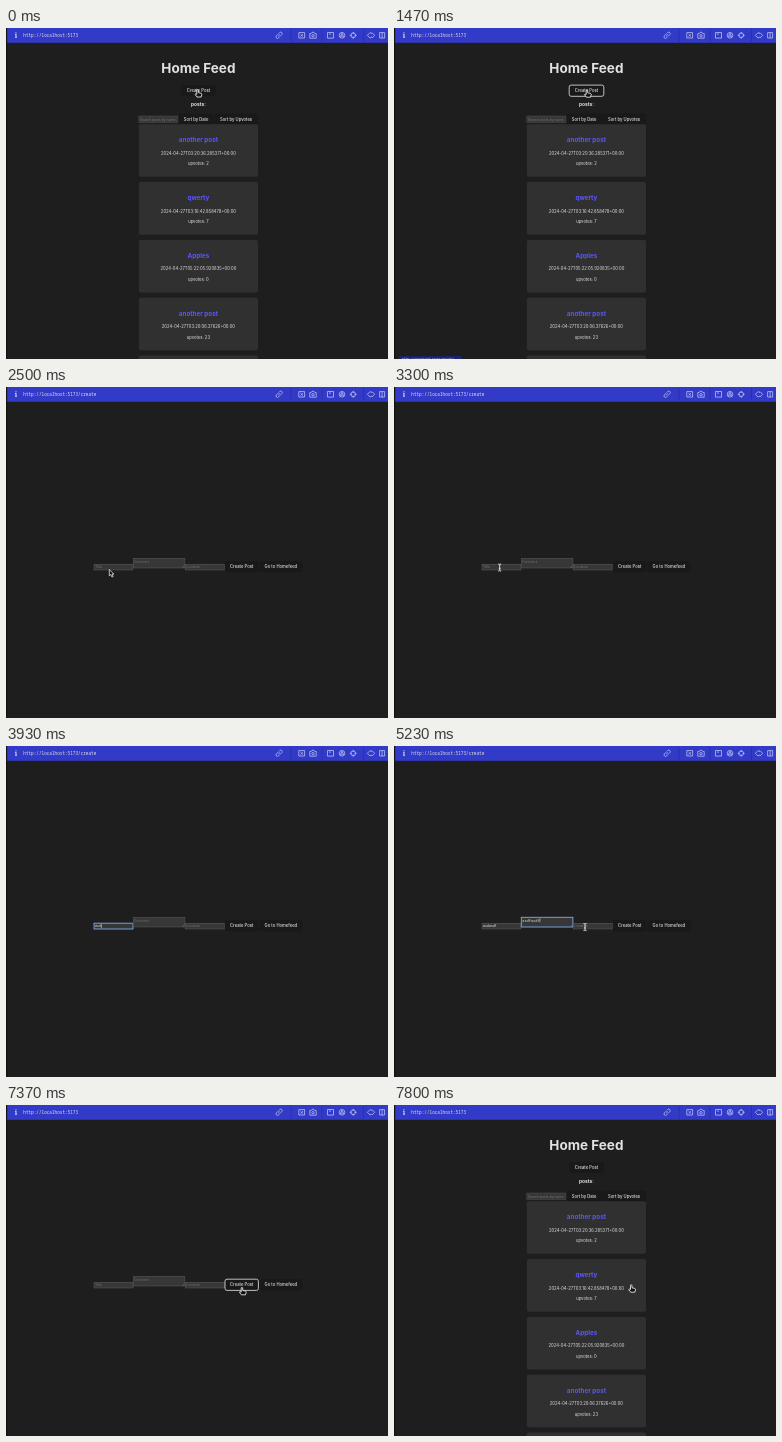
Recreate the animation shown at these times as an HTML page. Size 382 by 331 pixels, loop 8 s.

```html
<!DOCTYPE html>
<html lang="en">
<head>
<meta charset="utf-8">
<title>Home Feed</title>
<style>
html, body { margin: 0; width: 100%; height: 100%; overflow: hidden; background: #1e1e1e; }
svg { display: block; width: 382px; height: 331px; }
text { font-family: Inter, sans-serif; fill: #e2e2e2; white-space: pre; }
.mono { font-family: "Noto Sans Mono", "DejaVu Sans Mono", monospace; }
.icon { fill: none; stroke: #c3c7f3; stroke-width: .75; }
</style>
</head>
<body>
<svg id="stage" viewBox="0 0 382 331"></svg>
<script>
const LOOP = 8000;
const stage = document.getElementById('stage');
const $ = id => document.getElementById(id);

const rect = (x, y, w, h, fill, extra = '') =>
  `<rect x="${x}" y="${y}" width="${w}" height="${h}" fill="${fill}" ${extra}/>`;
// cy is the vertical middle of the capitals
const label = (s, x, cy, size, extra = '') =>
  `<text x="${x}" y="${cy + size * .36}" font-size="${size}" ${extra}>${s}</text>`;
const centered = (s, x, cy, size, weight = 400, extra = '') =>
  label(s, x, cy, size, `text-anchor="middle" font-weight="${weight}" ${extra}`);
const button = (s, x, y, w, id) =>
  rect(x, y, w, 11.2, '#191919', `rx="2" stroke-width=".8" ${id ? `id="${id}"` : ''}`) +
  centered(s, x + w / 2, y + 5.6, 4.2, 500);

const posts = [
  ['another post', '2024-04-27T03:20:36.285371+00:00', 2],
  ['qwerty', '2024-04-27T03:16:42.858478+00:00', 7],
  ['Apples', '2024-04-27T05:22:05.920835+00:00', 0],
  ['another post', '2024-04-27T03:20:06.37626+00:00', 23],
];
const card = ([title, date, votes], i) => {
  const y = 96.2 + i * 57.85;
  return rect(132.8, y, 119.2, 52.6, '#303030', 'rx="2"') +
    centered(title, 192.4, y + 15.8, 6.3, 700, 'style="fill:#5c57f6"') +
    centered(date, 192.4, y + 29, 4.2) +
    centered('upvotes: ' + votes, 192.4, y + 39.7, 4.2);
};

const icons = `
  <path d="M10 5.7V9.2M9.2 6.4H10M9 9.2H11M10 4V4.8" stroke="#fff"/>
  <path d="M272.6 5.6l1.2-1.2a1.5 1.5 0 0 1 2.1 2.1l-1.9 1.9M273.6 8.9l-1.2 1.2a1.5 1.5 0 0 1-2.1-2.1l1.9-1.9M272.2 8.2l1.8-1.8"/>
  <path d="M292.8 4.6h5.8v5.4h-5.8zM294.5 6.2l2.5 2.4M297 6.2l-2.5 2.4"/>
  <path d="M303.8 5.5h1.4l.8-1.2h2l.8 1.2h1.4v4.7h-6.4z"/><circle cx="307" cy="7.7" r="1.2"/>
  <path d="M321.5 4.5h6v5.6h-6zM323 6.1h2"/>
  <circle cx="336" cy="7.3" r="2.8"/><circle cx="336" cy="7.3" r="1.1"/><path d="M336 4.5v1.7M333.6 8.7l1.5-.8M338.4 8.7l-1.5-.8"/>
  <circle cx="347.2" cy="7.3" r="2.4"/><path d="M347.2 3.9v2.1M347.2 8.6v2.1M343.8 7.3h2.1M348.5 7.3h2.1"/>
  <path d="M364 4.6l-2.6 2.7 2.6 2.7M366 4.6l2.6 2.7-2.6 2.7M364 4.6l2 1M364 10l2-1"/>
  <path d="M373.6 4.6h5v5.4h-5zM376.1 4.6v5.4"/>
  <path d="M285 1v13M316 1v13M357.5 1v13" stroke="#272ea6"/>`;

const field = (id, x, y, w, h) =>
  rect(x, y, w, h, '#373737', `id="${id}Box"`) +
  label('', x + 1, id === 'content' ? y + 3 : y + h / 2 + .1, id === 'content' ? 3.6 : 3.5,
    `id="${id}" ${id === 'content' ? 'class="mono"' : ''}`) +
  rect(0, y + 1, .45, 4, '#fff', `id="${id}Caret"`);

stage.innerHTML =
  rect(0, 0, 382, 331, '#1e1e1e') +
  `<g id="home"><g id="head">
    ${centered('Home Feed', 192.4, 40.6, 13.5, 700)}
    ${button('Create Post', 175.2, 57.1, 34.6, 'newBtn')}
    ${centered('posts:', 192.4, 76.4, 4.9, 700)}
    ${rect(132.8, 88, 39.2, 6.6, '#373737', 'stroke="#555" stroke-width=".4"')}
    ${label('Search posts by name...', 133.8, 91.3, 3.4, 'style="fill:#727272"')}
    ${button('Sort by Date', 172.6, 85.5, 35)}
    ${button('Sort by Upvotes', 208.2, 85.5, 43.8)}
  </g><g id="cards">${posts.map(card).join('')}
    ${rect(132.8, 327.6, 119.2, 8, '#303030', 'rx="2"')}</g></g>
  <g id="form">
    ${field('title', 88, 177.2, 39, 5.8)}
    ${field('content', 127.3, 171.3, 51.6, 9.7)}
    <path d="M176.6 180.5l1.8-1.8M177.7 180.5l.7-.7" stroke="#999" stroke-width=".35"/>
    ${field('location', 179.2, 177.2, 39, 5.8)}
    ${button('Create Post', 219, 174.2, 33.4, 'sendBtn')}
    ${button('Go to Homefeed', 253.2, 174.2, 43.4)}
  </g>
  <g id="status">${rect(5, 328.3, 63, 8, '#1d2280', 'rx="1.5"')}
    ${label('http://localhost:5173/create', 8, 331.4, 4, 'style="fill:#aab"')}</g>` +
  rect(0, 0, 1.2, 331, '#131313') +
  rect(1.2, 0, 381, 14.8, '#323ac8') +
  `<g class="icon">${icons}</g>` +
  label('', 17.3, 7.4, 4.35, 'id="url" class="mono"') +
  `<g id="hand"><path d="M-.8 .2Q0-.6.7.2V2.8L3.6 3.5Q4.4 3.8 4.2 4.8L3.5 7.2H-.6L-2.6 4.6Q-2.4 3.6-.8 4.5Z" fill="#111" stroke="#fff" stroke-width=".8"/></g>
  <g id="arrow"><path d="M0 0V6.2L1.5 4.9 2.6 7.4 3.8 6.9 2.7 4.5H4.6Z" fill="#111" stroke="#fff" stroke-width=".7"/></g>
  <g id="beam"><path d="M-1.5-3.5Q0-3.5 0-2.6Q0-3.5 1.5-3.5M0-2.6V2.8M-1.5 3.6Q0 3.6 0 2.8Q0 3.6 1.5 3.6M-.8.9H.8" fill="none" stroke="#eee" stroke-width=".9"/></g>`;

const clamp = v => Math.max(0, Math.min(1, v));
const show = (id, on) => $(id).setAttribute('visibility', on ? 'visible' : 'hidden');

// time, x, y of the pointer tip
const path = [
  [0, 191.6, 61.8], [400, 191.6, 61.8], [700, 193, 62], [1900, 193, 62],
  [2480, 103.3, 182.6], [2930, 103.3, 182.6], [3400, 106, 180.2], [4980, 106, 180.2],
  [5200, 191, 181], [5850, 191, 181], [6010, 236, 182.6], [7630, 236, 182.6],
  [7790, 237.3, 180], [8000, 237.3, 180],
];
// time from which each pointer shape holds
const shapes = [[0, 'hand'], [1900, 'arrow'], [3060, 'beam'], [3770, ''], [4980, 'beam'],
  [5500, ''], [5850, 'beam'], [5960, 'hand']];

// typed text, first and last key, focus span
const fields = {
  title: { text: 'asdasdf', hint: 'Title', keys: [3780, 4200], focus: [3600, 4290] },
  content: { text: 'asdfasdf', hint: 'Content', keys: [4640, 4960], focus: [4290, 5350] },
  location: { text: 'asdfasdf', hint: 'Location', keys: [5510, 5830], focus: [5350, 6340] },
};

function pointer(t) {
  const i = path.findIndex((p, k) => k && t <= p[0]);
  const [t0, x0, y0] = path[i - 1], [t1, x1, y1] = path[i];
  const k = (t - t0) / (t1 - t0), e = k * k * (3 - 2 * k);
  const shape = shapes.filter(s => s[0] <= t).pop()[1];
  for (const id of ['hand', 'arrow', 'beam']) show(id, id === shape);
  if (shape) $(shape).setAttribute('transform', `translate(${x0 + (x1 - x0) * e} ${y0 + (y1 - y0) * e})`);
}

function drawField(id, t, visible) {
  const { text, hint, keys: [a, b], focus: [from, to] } = fields[id];
  const n = t < a || t >= 6990 ? 0 : Math.min(text.length, 1 + Math.floor((t - a) / (b - a) * (text.length - 1)));
  const el = $(id), box = $(id + 'Box'), focused = t >= from && t < to;
  el.textContent = n ? text.slice(0, n) : hint;
  el.style.fill = n ? '#e2e2e2' : '#727272';
  box.setAttribute('stroke', focused ? '#7fa8ea' : '#666');
  box.setAttribute('stroke-width', focused ? .9 : .4);
  const caret = $(id + 'Caret');
  caret.setAttribute('x', +el.getAttribute('x') + (n ? el.getComputedTextLength() + .2 : 0));
  show(id + 'Caret', visible && focused);
}

function draw(t) {
  const form = t >= 1665 && t < 7385;
  const empty = t >= 7385 && t < 7650;
  $('home').style.display = form ? 'none' : '';
  $('form').style.display = form ? '' : 'none';
  $('cards').style.display = empty ? 'none' : '';
  $('head').setAttribute('transform', `translate(0 ${empty ? 112.5 : 0})`);
  $('url').textContent = 'http://localhost:5173' + (t >= 1650 && t < 6985 ? '/create' : '');
  show('status', t >= 1080 && t < 1690);

  const newBtn = $('newBtn'), sendBtn = $('sendBtn');
  newBtn.setAttribute('stroke', t >= 1440 ? '#e8e8f0' : '#5058d8');
  newBtn.setAttribute('stroke-opacity', t < 1665 ? clamp((t - 30) / 670) * .3 + (t >= 1440 ? .7 : 0) : 0);
  sendBtn.setAttribute('stroke', t >= 6340 ? '#e8e8f0' : '#444cc8');
  sendBtn.setAttribute('stroke-opacity', t >= 6340 ? 1 : clamp((t - 5930) / 250));

  for (const id in fields) drawField(id, t, form);
  pointer(t);
}

const start = performance.now();
function tick() {
  draw((performance.now() - start) % LOOP);
  requestAnimationFrame(tick);
}
tick();
</script>
</body>
</html>
```
